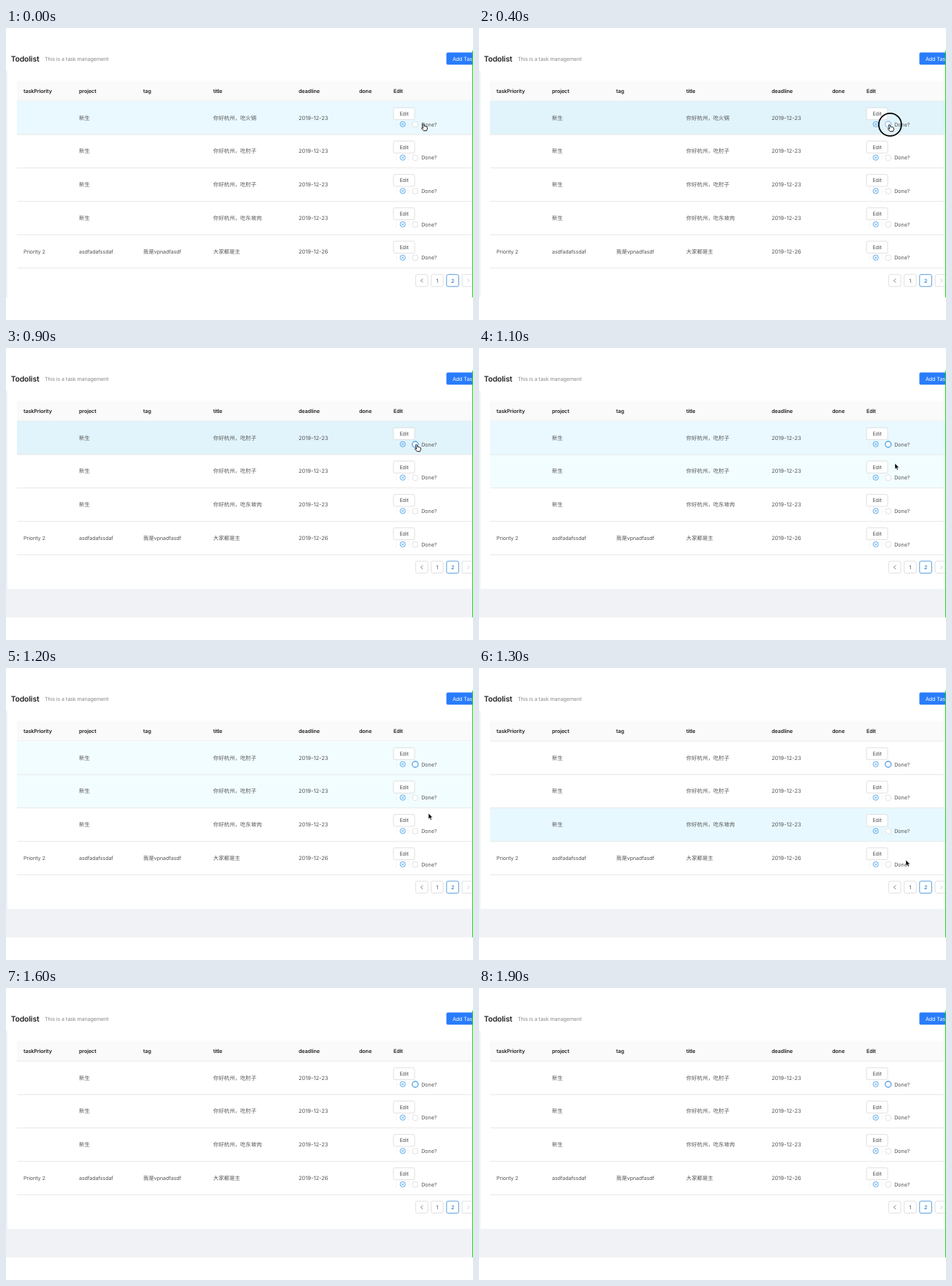
An HTML page that plays this animation: 640 by 400 pixels, repeating every 2 s.

```html
<!DOCTYPE html>
<html lang="zh-CN">
<head>
<meta charset="utf-8">
<title>Todolist</title>
<style>
  html, body { margin: 0; width: 100%; height: 100%; overflow: hidden; background: #fff; }
  svg { display: block; width: 640px; height: 400px; }
  text { font: 7.2px Inter, "Noto Sans CJK SC", "Noto Sans CJK", sans-serif; letter-spacing: -.12px; fill: #555; text-rendering: geometricPrecision; }
  .cjk { font-family: "Noto Sans CJK SC", "Noto Sans CJK", sans-serif; font-size: 7.4px; letter-spacing: 0; }
  .date { font-size: 7.5px; letter-spacing: 0; }
  .head { font-weight: 600; fill: #222; }
  .brand { font-size: 10.4px; font-weight: 600; letter-spacing: -.15px; fill: #222; }
  .sub { fill: #888; }
  .mid { text-anchor: middle; }
  .box { fill: #fff; stroke: #d9d9d9; stroke-width: .8; }
  .line { fill: #e8e8e8; }
  .icon { fill: none; stroke: #3f9bea; stroke-width: .85; }
  .active { stroke: #2a83d8; }
  text.active { fill: #1f78d4; stroke: none; font-weight: 500; }
  .chevron { fill: none; stroke: #555; stroke-width: .8; }
  .off { stroke: #c4c4c4; }

  .panel, .before, .after, .hl, .focus, .page, .pointer, .hand, .arrow, .ring { animation: 2s step-end infinite; }
  .panel { animation-name: shrink; }
  .before { animation-name: before; }
  .after { animation-name: after; }
  .focus { animation-name: focus; }
  .page { animation-name: page; }
  .pointer { animation-name: move; }
  .hand { animation-name: hand; }
  .arrow { animation-name: arrow; }
  .ring { animation-name: ring; }
  .hl { fill: transparent; }
  .hl0 { animation-name: hl0; }
  .hl1 { animation-name: hl1; }
  .hl2 { animation-name: hl2; }
  .hl3 { animation-name: hl3; }

  @keyframes shrink { 0% { height: 317px; } 30%, 100% { height: 271px; } }
  @keyframes before { 0% { visibility: visible; } 30%, 100% { visibility: hidden; } }
  @keyframes after { 0% { visibility: hidden; } 30%, 100% { visibility: visible; } }
  @keyframes focus {
    0% { visibility: hidden; }
    10% { visibility: visible; stroke: #8cc4f2; }
    30%, 100% { visibility: visible; stroke: #3f9bea; }
  }
  @keyframes page { 70% { fill: #1f78d4; } 75% { fill: #555; } }
  @keyframes hl0 {
    0% { fill: #e9f9ff; } 5% { fill: #e5f6fd; } 10% { fill: #e1f3fb; }
    55% { fill: #e9f9ff; } 60% { fill: #f2fdff; } 65%, 100% { fill: transparent; }
  }
  @keyframes hl1 { 0% { fill: transparent; } 55% { fill: #f2fdff; } 65%, 100% { fill: transparent; } }
  @keyframes hl2 { 0% { fill: transparent; } 65% { fill: #e8f8ff; } 70%, 100% { fill: transparent; } }
  @keyframes hl3 { 0% { fill: transparent; } 70% { fill: #f3feff; } 75%, 100% { fill: transparent; } }
  @keyframes move {
    0% { transform: translate(572px, 131px); }
    5% { transform: translate(568px, 132px); }
    10% { transform: translate(563px, 132px); }
    55% { transform: translate(570px, 158px); }
    60% { transform: translate(579px, 199px); }
    65% { transform: translate(585px, 263px); }
    70% { transform: translate(596px, 327px); }
    75% { transform: translate(609px, 343px); }
    80%, 100% { transform: translate(660px, 343px); }
  }
  @keyframes hand { 0% { visibility: visible; } 55%, 100% { visibility: hidden; } }
  @keyframes arrow { 0% { visibility: hidden; } 55%, 100% { visibility: visible; } }
  @keyframes ring { 0% { visibility: hidden; } 20% { visibility: visible; } 30%, 100% { visibility: hidden; } }
</style>
</head>
<body>
<svg viewBox="0 0 640 400">
  <defs>
    <clipPath id="screen"><rect y="31" width="640" height="338"/></clipPath>
    <g id="controls">
      <rect class="box" x="531" y="109.2" width="29" height="16.4" rx="2"/>
      <text class="mid" x="545.6" y="120">Edit</text>
      <path d="M535.3 128v8M552.2 128v8" stroke="#efefef" stroke-width=".7"/>
      <circle class="icon" cx="543.7" cy="131.8" r="3.6"/>
      <path class="icon" d="M542.3 130.4l2.8 2.8m0-2.8l-2.8 2.8"/>
      <circle class="box" cx="560.8" cy="132" r="4"/>
      <text x="569.3" y="134.5">Done?</text>
    </g>
  </defs>
  <g clip-path="url(#screen)">
    <rect y="59" width="640" height="310" fill="#f0f2f5"/>
    <rect class="panel" x="2" y="59" width="638" height="317" fill="#fff"/>
    <rect y="31" width="640" height="28" fill="#fff"/>
    <text class="brand" x="6.7" y="45.7">Todolist</text>
    <text class="sub" x="53" y="44.8">This is a task management</text>
    <rect x="603.5" y="33.4" width="50" height="16.8" rx="2" fill="#2a7cfb"/>
    <text x="612" y="44.6" style="fill:#fff">Add Task</text>
    <rect x="15" y="72" width="625" height="28" fill="#fafafa"/>
    <rect class="line" x="15" y="99.6" width="625" height="1"/>
    <g id="header"></g>
    <g id="highlights"></g>
    <g id="before" class="before"></g>
    <g id="after" class="after"></g>
    <circle class="icon focus" cx="560.8" cy="132" r="4.1" style="stroke-width:1.1"/>
    <rect x="639" y="31" width="1" height="338" fill="#1cd91c"/>
    <g class="pointer">
      <circle class="ring" cx=".4" cy=".4" r="15.5" fill="none" stroke="#000" stroke-width="1.7"/>
      <path class="hand" fill="#fff" stroke="#000" stroke-width=".9" stroke-linejoin="round"
        d="M-1.6 .9Q-.7-.4 .3.9L1.2 3.7Q2 3 2.6 3.8Q3.5 3.3 4 4.2Q5.1 4 5.3 5.2L5.4 7.2L4.4 9.7H.4L-2.4 6.7Q-2.9 5.4-1.5 5.6L-.3 6.3Z"/>
      <path class="arrow" fill="#000" stroke="#fff" stroke-width=".5"
        d="M0 0V8L1.8 6.3L3 9.2L4.4 8.6L3.2 5.8H5.6Z"/>
    </g>
  </g>
</svg>
<script>
  const pitch = 45.7;
  const columns = [24, 100, 188, 284, 401, 484, 531];
  const titles = ["taskPriority", "project", "tag", "title", "deadline", "done", "Edit"];
  const rows = [
    ["", "新生", "", "你好杭州，吃火锅", "2019-12-23"],
    ["", "新生", "", "你好杭州，吃肘子", "2019-12-23"],
    ["", "新生", "", "你好杭州，吃肘子", "2019-12-23"],
    ["", "新生", "", "你好杭州，吃东坡肉", "2019-12-23"],
    ["Priority 2", "asdfadafssdaf", "我是vpnadfasdf", "大家都是主", "2019-12-26"]
  ];

  const fill = (id, html) => { document.getElementById(id).innerHTML = html; };
  const moved = (y, html) => `<g transform="translate(0 ${y})">${html}</g>`;
  const label = (x, y, value, cls = "") => {
    const body = value.replace(/[^\x00-\x7f]+/g, s => `<tspan class="cjk">${s}</tspan>`);
    return `<text class="${cls}" x="${x}" y="${y}">${body}</text>`;
  };

  const row = (cells, i) => moved(i * pitch,
    cells.map((c, k) => label(columns[k], 125.8, c, k === 4 ? "date" : "")).join("") +
    `<use href="#controls"/><rect class="line" x="15" y="145.5" width="625" height="1"/>`);

  const pageBox = (x, cls = "") =>
    `<rect class="box ${cls}" x="${x - 8.3}" y="109.2" width="16.6" height="16.4" rx="2"/>`;
  const pager =
    pageBox(569.7) + `<path class="chevron" d="M571.1 114.9l-2.6 2.6 2.6 2.6"/>` +
    pageBox(590.9) + label(590.9, 120, "1", "mid page") +
    pageBox(612.1, "active") + label(612.1, 120, "2", "mid active") +
    pageBox(633.4) + `<path class="chevron off" d="M632.2 114.9l2.6 2.6-2.6 2.6"/>`;

  const table = list => list.map(row).join("") + moved(list.length * pitch, pager);

  fill("header", titles.map((t, i) => label(columns[i], 88.7, t, "head")).join(""));
  fill("highlights", [0, 1, 2, 3].map(i =>
    `<rect class="hl hl${i}" x="15" y="${100 + i * pitch}" width="625" height="${pitch}"/>`).join(""));
  fill("before", table(rows));
  fill("after", table(rows.slice(1)));
</script>
</body>
</html>
```
